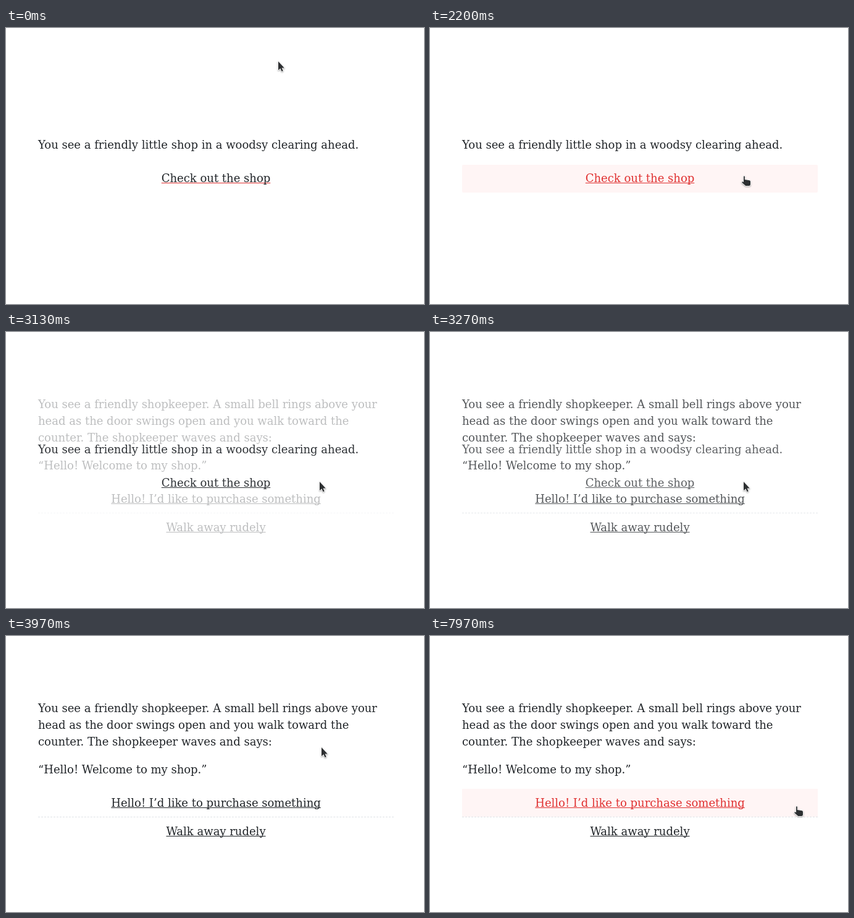
An HTML page that plays this animation: 677x446 px, repeating every 8000 ms.

```html
<!DOCTYPE html>
<html lang="en">
<head>
<meta charset="utf-8">
<title>Shop story</title>
<style>
html, body {
  margin: 0;
  width: 100%;
  height: 100%;
  overflow: hidden;
  background: #fff;
}
body {
  position: relative;
  font: 18px/27px "DejaVu Serif", serif;
  color: #212529;
}
.page {
  position: absolute;
  left: 52px;
  width: 576px;
}
#clearing { top: 175px; }
#clearing.leaving { top: 176px; }
#shop { top: 103px; opacity: 0; }
p { margin: 0 0 18px; white-space: nowrap; }
.link {
  padding: 9px 0;
  text-align: center;
}
.link span {
  text-decoration: underline 1px;
  text-decoration-skip-ink: none;
}
.link + .link { border-top: 1px dashed #dee2e6; }
#clearing .link {
  margin-top: 19px;
  padding: 8px 0 10px;
  border-radius: 2px;
}
#clearing p { margin: 0; }
#clearing:not(.leaving) span { text-decoration-color: #e03131; }
.link.hover { color: #e03131; background: #fff5f5; }
#cursor {
  position: absolute;
  left: 0;
  top: 0;
  width: 24px;
  height: 26px;
  overflow: visible;
  filter: drop-shadow(0 1px 1px rgba(0, 0, 0, .35));
}
#cursor path {
  fill: #2d2f31;
  stroke: #fff;
  stroke-width: 1.6;
  stroke-linejoin: round;
  paint-order: stroke;
}
</style>
</head>
<body>
<div class="page" id="clearing">
  <p>You see a friendly little shop in a woodsy clearing ahead.</p>
  <div class="link"><span>Check out the shop</span></div>
</div>
<div class="page" id="shop">
  <p>You see a friendly shopkeeper. A small bell rings above your<br>head as the door swings open and you walk toward the<br>counter. The shopkeeper waves and says:</p>
  <p>“Hello! Welcome to my shop.”</p>
  <div class="link"><span>Hello! I’d like to purchase something</span></div>
  <div class="link"><span>Walk away rudely</span></div>
</div>
<svg id="cursor">
  <path id="arrow" d="M1 1V15.3L4.3 12.2L6.6 17.2L8.8 16.2L6.6 11.4H10.8Z"/>
  <path id="hand" d="M1 -1.2Q1.9 -2.4 2.8 -1.2V4L10.5 5.3Q12 5.7 12 7.2V11.5Q12 14 9.6 14H4.2L-1.8 8.8Q-2 7.3 -.4 7.3L1 8.2Z"/>
</svg>
<script>
const DURATION = 8000;
const FPS = 30;
const FADE_START = 91;
const FADE_LENGTH = 15;

// Pointer moves: first tick, last tick, destination.
const start = [440, 53];
const moves = [
  [17, 23, 308, 87],
  [40, 47, 518, 115],
  [53, 66, 507, 241],
  [114, 117, 517, 205],
  [117, 119, 510, 179],
  [224, 229, 617, 207],
  [233, 239, 592, 277]
];

const $ = id => document.getElementById(id);
const clearing = $("clearing"), shop = $("shop");
const clearingLink = clearing.querySelector(".link");
const shopLink = shop.querySelector(".link");

const clamp = v => Math.min(1, Math.max(0, v));
const smooth = v => v * v * (3 - 2 * v);

function bezier(x1, y1, x2, y2) {
  const at = (a, b, s) => 3 * a * s * (1 - s) ** 2 + 3 * b * s * s * (1 - s) + s ** 3;
  return x => {
    let lo = 0, hi = 1;
    for (let i = 0; i < 24; i++) {
      const mid = (lo + hi) / 2;
      if (at(x1, x2, mid) < x) lo = mid; else hi = mid;
    }
    return at(y1, y2, hi);
  };
}
const ease = bezier(.25, .1, .25, 1);
const easeIn = bezier(.42, 0, 1, 1);

function pointerAt(tick) {
  let [x, y] = start;
  for (const [from, to, toX, toY] of moves) {
    const k = smooth(clamp((tick - from) / (to - from)));
    x += (toX - x) * k;
    y += (toY - y) * k;
  }
  return [Math.round(x), Math.round(y)];
}

function render(ms) {
  const tick = Math.floor((ms + 4) * FPS / 1000);
  const [x, y] = pointerAt(tick);
  const left = tick >= FADE_START;
  const fade = clamp((tick - FADE_START) / FADE_LENGTH);
  const overClearing = !left && y >= 221;
  const overShop = left && y >= 247;
  const over = overClearing || overShop;

  clearing.classList.toggle("leaving", left);
  clearing.style.opacity = fade < 1 ? 1 - easeIn(fade) : 0;
  shop.style.opacity = fade > 0 ? ease(fade) : 0;
  clearingLink.classList.toggle("hover", overClearing);
  shopLink.classList.toggle("hover", overShop);

  $("cursor").style.transform = `translate(${x}px, ${y}px)`;
  $("arrow").style.display = over ? "none" : "";
  $("hand").style.display = over ? "" : "none";
}

const began = performance.now();
function loop() {
  render((performance.now() - began) % DURATION);
  requestAnimationFrame(loop);
}
loop();
</script>
</body>
</html>
```
